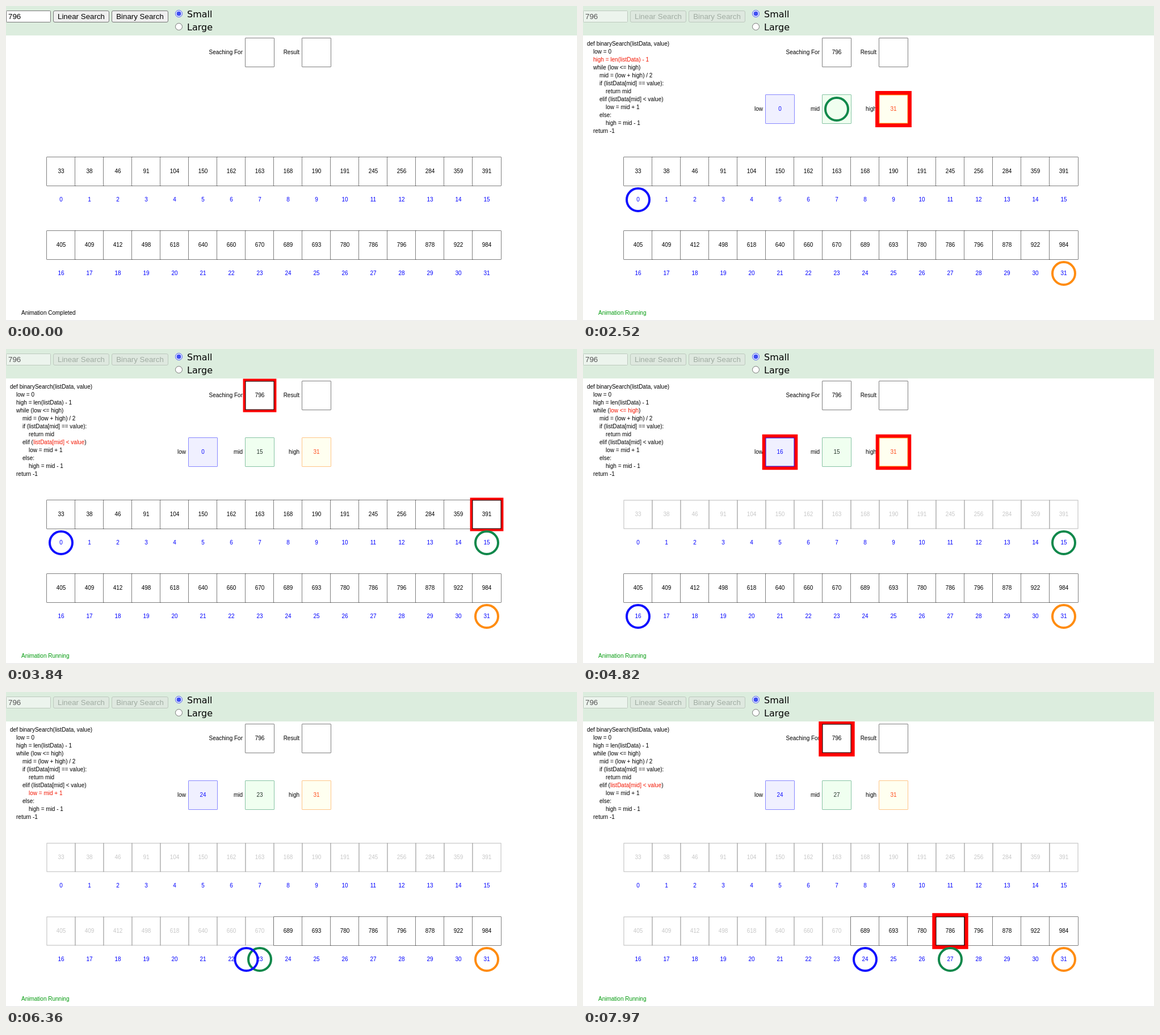
Animation, 1006 px wide and 556 px high, one loop 8000 ms. Source, as an HTML page:

```html
<!DOCTYPE html>
<html lang="en">
<head>
<meta charset="utf-8">
<title>Binary search</title>
<style>
html, body { margin: 0; width: 100%; height: 100%; overflow: hidden; background: #fff; }
svg { display: block; }
text { font: 10px "Liberation Sans", Arial, sans-serif; white-space: pre; }
.ui { font-size: 13.333px; }
.radio { font: 16px "DejaVu Sans", Verdana, sans-serif; }
.mid { text-anchor: middle; }
.end { text-anchor: end; }
.box { paint-order: stroke; }
</style>
</head>
<body>
<svg id="stage" width="1006" height="556" viewBox="0 0 1006 556"></svg>
<script>
const LOOP = 8000, RUN = 1680, START = 1747, STEP = 390.4;
const data = [33, 38, 46, 91, 104, 150, 162, 163, 168, 190, 191, 245, 256, 284, 359, 391,
  405, 409, 412, 498, 618, 640, 660, 670, 689, 693, 780, 786, 796, 878, 922, 984];
// indent, text before, highlighted part, text after
const code = [
  [0, 'def binarySearch(listData, value)', '', ''],
  [1, '', 'low = 0', ''],
  [1, '', 'high = len(listData) - 1', ''],
  [1, 'while (', 'low <= high', ')'],
  [2, '', 'mid = (low + high) / 2', ''],
  [2, 'if (', 'listData[mid] == value', '):'],
  [3, '', 'return mid', ''],
  [2, 'elif (', 'listData[mid] < value', ')'],
  [3, '', 'low = mid + 1', ''],
  [2, 'else:', '', ''],
  [3, '', 'high = mid - 1', ''],
  [1, '', 'return -1', '']
];

const stage = document.getElementById('stage');
function add(tag, attrs, parent = stage, text) {
  const el = document.createElementNS('http://www.w3.org/2000/svg', tag);
  for (const key in attrs) el.setAttribute(key, attrs[key]);
  if (text !== undefined) el.textContent = text;
  parent.appendChild(el);
  return el;
}
const set = (el, attrs) => { for (const key in attrs) el.setAttribute(key, attrs[key]); };
const show = (el, on) => el.setAttribute('visibility', on ? 'visible' : 'hidden');
const label = (x, y, str, cls = '', fill = '#000', parent = stage) =>
  add('text', { x, y, class: cls, fill }, parent, str);

function makeBox(x, y, fill, stroke, ink, str, parent) {
  const rect = add('rect', { x: x - 25, y: y - 25, width: 50, height: 50, class: 'box', fill, stroke }, parent);
  return { x, y, stroke, rect, text: label(x, y + 3, str, 'mid', ink, parent) };
}

const spot = i => ({ x: 97 + 50 * (i % 16), y: i < 16 ? 342 : 472 });
const cells = data.map((v, i) => {
  const p = spot(i);
  return makeBox(p.x, p.y - 50, '#fff', '#000', '#000', v);
});
data.forEach((v, i) => label(spot(i).x, spot(i).y + 3, i, 'mid', '#00f'));

label(417, 85, 'Seaching For', 'end');
label(517, 85, 'Result', 'end');
const query = makeBox(447, 82, '#fff', '#000', '#000', '');
makeBox(547, 82, '#fff', '#000', '#000', '');
const status = label(27, 545, '');
add('rect', { x: 0, y: 555, width: 1006, height: 1, fill: '#e2e2e2' });

const live = add('g', {});
const lines = code.map(([indent, pre, hot, post], i) => {
  const line = label(7 + 11 * indent, 70 + 14 * i, '', '', '#000', live);
  add('tspan', {}, line, pre);
  const span = add('tspan', {}, line, hot);
  add('tspan', {}, line, post);
  return span;
});

// moves: [step, index reached]; values: [step, number shown]
function pointer(name, x, fill, stroke, ink, moves) {
  label(x - 30, 185, name, 'end', '#000', live);
  return { box: makeBox(x, 182, fill, stroke, ink, '', live), stroke, moves };
}
const low = pointer('low', 347, '#f0f0ff', '#1010ff', '#1010ff', [[0, 0], [6, 16], [11, 24]]);
const mid = pointer('mid', 447, '#f0fff0', '#10884b', '#26352c', [[3, 15], [8, 23], [13, 27]]);
const high = pointer('high', 547, '#fffff0', '#ff8c10', '#ff4d1c', [[1, 31]]);
const pointers = [low, mid, high];

const rings = [0, 1].map(() => {
  const g = add('g', {}, live);
  return {
    g,
    frame: add('path', { fill: '#f00', 'fill-rule': 'evenodd' }, g),
    edge: add('rect', { x: -25, y: -25, width: 50, height: 50, fill: 'none' }, g)
  };
});
for (const p of [mid, high, low])
  p.circle = add('circle', { r: 20, fill: 'none', stroke: p.stroke, 'stroke-width': 4 }, live);

// toolbar
add('rect', { width: 1006, height: 52, fill: '#dcedde' });
function control(x, w, str, tx, cls, radius) {
  const rect = add('rect', { x: x + .5, y: 8.5, width: w - 1, height: 20, rx: radius });
  return { rect, text: label(tx, 23, str, 'ui ' + cls) };
}
const input = control(0, 79, '796', 4, '', 1);
const linear = control(83, 99, 'Linear Search', 132.5, 'mid', 2.5);
const binary = control(186, 100, 'Binary Search', 236, 'mid', 2.5);
function paint(c, fill, stroke, ink) {
  set(c.rect, { fill, stroke });
  c.text.setAttribute('fill', ink);
}
add('circle', { cx: 304.5, cy: 13.5, r: 6, fill: '#fff', stroke: '#3f4ff2' });
add('circle', { cx: 304.5, cy: 13.5, r: 4, fill: '#3f4ff2' });
add('circle', { cx: 304.5, cy: 36.5, r: 6, fill: '#fff', stroke: '#767676' });
label(319, 20, 'Small', 'radio');
label(319, 43, 'Large', 'radio');

const cursor = add('path', {
  d: 'M.5 .5V16L4 12.7L6.6 18.5L9 17.5L6.5 11.8H11.5Z', fill: '#fff', stroke: '#000'
});
// time, x, y; no position hides the cursor
const track = [[0], [130, 936, 539], [200, 503, 188], [270], [530, 256, 1], [600, 232, 8],
  [670, 214, 13], [740, 205, 17], [2100, 947, 325], [2170]];

function place(p, k, f) {
  let at = { x: p.box.x, y: 182 };
  for (const [step, i] of p.moves) {
    if (k < step) break;
    const to = spot(i), u = k > step || f > .95 ? 1 : f;
    at = { x: at.x + (to.x - at.x) * u, y: at.y + (to.y - at.y) * u };
  }
  set(p.circle, { cx: at.x, cy: at.y });
}

function valueAt(p, k) {
  const done = p.moves.filter(m => m[0] <= k);
  return done.length ? done[done.length - 1][1] : '';
}

function targets(k) {
  if (k < 0) return [];
  if (k < 2) return [[low, high][k].box];
  const phase = (k - 2) % 5;
  if (phase === 0) return [low.box, high.box];
  if (phase === 1) return [mid.box];
  return phase < 4 ? [query, cells[valueAt(mid, k)]] : [];
}

function draw(t) {
  const running = t >= RUN;
  const shift = t < 3270 ? 0 : 10;
  const tick = Math.floor((t + shift) / 70) * 70 - shift;
  const s = (tick - START) / STEP, k = running ? Math.floor(s) : -1, f = s - Math.floor(s);

  show(live, running);
  query.text.textContent = running ? '796' : '';
  status.textContent = running ? 'Animation Running' : 'Animation Completed';
  status.setAttribute('fill', running ? '#009a0c' : '#000');

  const hot = k < 0 ? -1 : k < 2 ? k + 1 : [3, 4, 5, 7, 8][(k - 2) % 5];
  lines.forEach((el, i) => el.setAttribute('fill', i === hot ? '#f31500' : '#000'));

  for (const p of pointers) {
    place(p, k, f);
    p.box.text.textContent = valueAt(p, k);
  }

  const cut = k >= 6 ? valueAt(low, k) : 0;
  cells.forEach((c, i) => {
    const off = i < cut;
    set(c.rect, { 'stroke-opacity': off ? .3 : 1, 'fill-opacity': off ? .2 : 1 });
    c.text.setAttribute('opacity', off ? .22 : 1);
  });

  const marked = targets(k), h = 28.8 + 6 * Math.abs(f - .46);
  rings.forEach((r, i) => {
    const b = marked[i];
    r.g.setAttribute('display', b ? 'inline' : 'none');
    if (!b) return;
    r.g.setAttribute('transform', `translate(${b.x} ${b.y})`);
    r.frame.setAttribute('d', `M${-h} ${-h}H${h}V${h}H${-h}ZM-25 -25H25V25H-25Z`);
    r.edge.setAttribute('stroke', b.stroke);
  });

  if (running) {
    paint(input, '#ecf4ed', '#bdc9be', '#545454');
    for (const b of [linear, binary]) paint(b, '#dee8df', '#bdc9be', '#a0aca2');
  } else {
    paint(input, '#fff', '#767676', '#000');
    paint(linear, '#efefef', '#767676', '#000');
    if (t >= 530) paint(binary, '#e5e5e5', '#4f4f4f', '#000');
    else paint(binary, '#efefef', '#767676', '#000');
  }

  const [, x, y] = track.filter(p => p[0] <= t).pop();
  show(cursor, x !== undefined);
  if (x !== undefined) cursor.setAttribute('transform', `translate(${x} ${y})`);
}

const begin = performance.now();
function loop() {
  draw((performance.now() - begin) % LOOP);
  requestAnimationFrame(loop);
}
loop();
</script>
</body>
</html>
```
